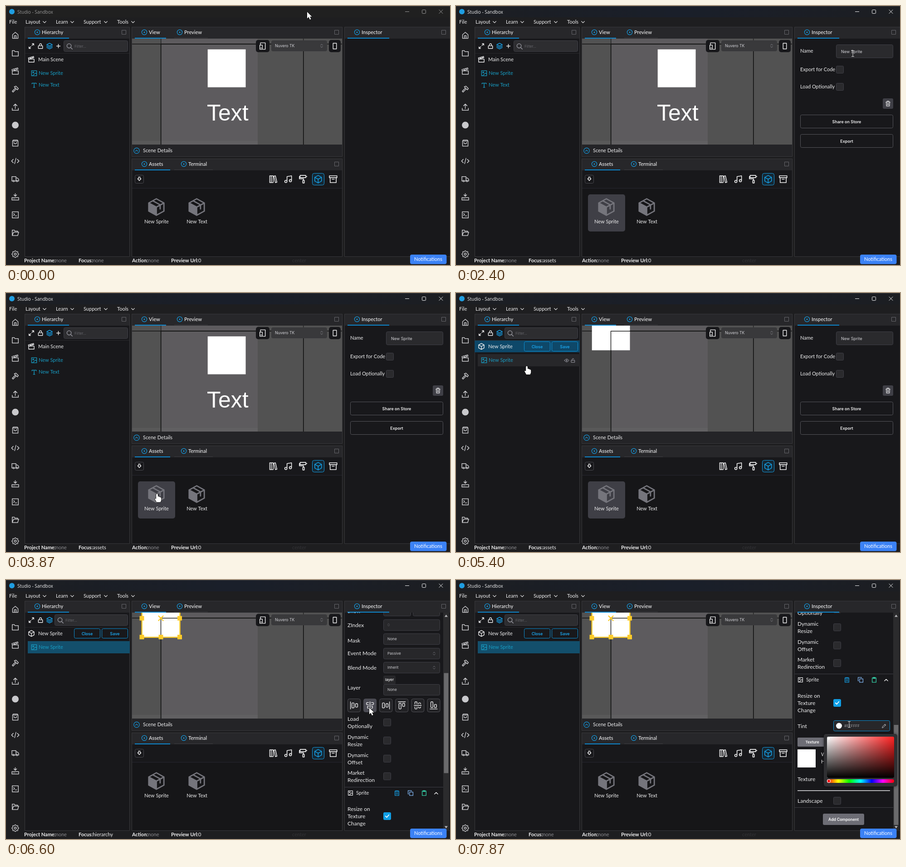
An HTML page with a canvas that plays this animation: 979 px wide and 572 px high, repeating every 8 s.

```html
<!DOCTYPE html>
<html lang="en">
<head>
<meta charset="utf-8">
<title>Studio</title>
<style>
html, body { margin: 0; width: 100%; height: 100%; overflow: hidden; background: #18181b; }
canvas { display: block; width: 979px; height: 572px; }
</style>
</head>
<body>
<canvas id="stage" width="979" height="572"></canvas>
<script>
const ctx = document.getElementById('stage').getContext('2d');
const LOOP = 8000;
const UI = '11px Lato, sans-serif', BOLD = 'bold 11px Lato, sans-serif', LABEL = '12px Lato, sans-serif';
const FIELD = '9px Inter, sans-serif', TINY = '8.2px Inter, sans-serif';
const BUTTON = '600 9px Inter, sans-serif', WINDOW = '10px "Open Sans", sans-serif';
const WHITE = '#f0f0f1', GREY = '#8a8a8f', BLUE = '#159be0', TEAL = '#189dc4', EDGE = '#3f3f46';
const PANEL = '#18181b', BAR = '#27272a';

// Rounded box as path data, for the alignment icons.
const pill = (x, y, w, h) => `M${x + 2} ${y}h${w - 4}q2 0 2 2v${h - 4}q0 2-2 2h${4 - w}q-2 0-2-2v${4 - h}q0-2 2-2z`;

const ICONS = {
  home: 'M4 10l8-7 8 7v11H4zM9.5 21v-8h5v8',
  folder: 'M3 4h6l2 3h10v13H3z',
  clapper: 'M3 11h18v10H3zM3 11l-1-4 17-5 1 4zM7 5.5l4 3.2M13 4l4 3',
  hammer: 'M14 12l-8.5 8.5-2.5-2.5L11.5 9.5M9 5l5-2 7 7-3 4z',
  upload: 'M3 15v6h18v-6M12 16V3M7 8l5-5 5 5',
  bag: 'M4 6h16v15H4zM4 6l2-3h12l2 3M8 10a4 4 0 0 0 8 0',
  code: 'M6 7l-5 5 5 5M18 7l5 5-5 5M14 4l-4 16',
  truck: 'M5 18H2V5h12v13H9M14 9h4l4 4v5h-3M5 18a2 2 0 1 0 4 0 2 2 0 1 0-4 0M15 18a2 2 0 1 0 4 0 2 2 0 1 0-4 0M14 18h1',
  drive: 'M12 2v8M8 6l4 4 4-4M2 14h20v7H2zM6 17.5h.1M10 17.5h.1',
  console: 'M3 3h18v18H3zM7 8l3 3-3 3M12 15h4',
  open: 'M3 20V4h6l2 3h8v3M3 20l4-10h15l-3 10z',
  expand: 'M14 10l7-7M15 3h6v6M10 14l-7 7M3 15v6h6',
  lock: 'M4 11h16v10H4zM8 11V7a4 4 0 0 1 8 0v4',
  unlock: 'M4 11h16v10H4zM8 11V7a4 4 0 0 1 8-1',
  layers: 'M12 2l10 5-10 5L2 7zM2 12l10 5 10-5M2 17l10 5 10-5',
  plus: 'M4 12h16M12 4v16',
  search: 'M3 10.5a7.5 7.5 0 1 0 15 0 7.5 7.5 0 1 0-15 0M16 16l6 6',
  image: 'M3 3h18v18H3zM7 9a2 2 0 1 0 4 0 2 2 0 1 0-4 0M21 15l-4-4L6 21',
  type: 'M4 7V4h16v3M12 4v16M9 20h6',
  box: 'M12 2l9 5v10l-9 5-9-5V7zM3 7l9 5 9-5M12 12v10',
  eye: 'M1 12q11-15 22 0-11 15-22 0M9 12a3 3 0 1 0 6 0 3 3 0 1 0-6 0',
  books: 'M3 3h4v18H3zM7 3h5v18H7zM14 4l4-1 4 17-4 1z',
  music: 'M9 18V5l12-2v13M3 18a3 3 0 1 0 6 0 3 3 0 1 0-6 0M15 16a3 3 0 1 0 6 0 3 3 0 1 0-6 0',
  roller: 'M4 2h15v6H4zM4 5H2v6h11v4M11 15h4v7h-4zM19 5h3',
  archive: 'M2 3h20v5H2zM4 8v13h16V8M9 12h6',
  arrow: 'M9 4h6v7h4l-7 8-7-8h4z',
  trash: 'M3 6h18M5 6l1 16h12l1-16M8 6V2h8v4M10 11v6M14 11v6',
  phone: 'M6 2h12v20H6z',
  devices: 'M5 9V2h15v20h-7M3 9h8v13H3zM6 18h2',
  list: 'M4 4h16v18H4zM8 2v4M12 2v4M16 2v4M8 11h8M8 16h8',
  copy: 'M8 8h14v14H8zM4 16H2V2h14v2',
  paste: 'M4 4h16v18H4zM8 2h8v4H8z',
  pencil: 'M3 21l1-5L16 4l4 4L8 20zM14 6l4 4',
  down: 'M4 8l8 8 8-8',
  up: 'M4 16l8-8 8 8',
  sort: 'M7 9l5-5 5 5M7 15l5 5 5-5',
  check: 'M4 12l6 6L20 6',
  cross: 'M4 4l16 16M20 4L4 20',
  alignLeft: 'M2 2v20' + pill(6, 5, 6, 14) + pill(16, 7, 6, 10),
  alignRight: 'M22 2v20' + pill(2, 5, 6, 14) + pill(12, 7, 6, 10),
  alignTop: 'M2 2h20' + pill(4, 6, 6, 16) + pill(14, 6, 6, 9),
  alignBottom: 'M2 22h20' + pill(4, 2, 6, 16) + pill(14, 9, 6, 9),
  alignCenter: 'M12 2v20M8 10H4q-2 0-2-2V6q0-2 2-2h4M16 10h4q2 0 2-2V6q0-2-2-2h-4M8 20H7q-2 0-2-2v-2q0-2 2-2h1M16 14h1q2 0 2 2v2q0 2-2 2h-1',
  alignMiddle: 'M2 12h20M10 16v4q0 2-2 2H6q-2 0-2-2v-4M10 8V4q0-2-2-2H6Q4 2 4 4v4M20 16v1q0 2-2 2h-2q-2 0-2-2v-1M14 8V7q0-2 2-2h2q2 0 2 2v1'
};
for (const name in ICONS) ICONS[name] = new Path2D(ICONS[name]);

const POINTER = new Path2D('M0 0V14.5L3.5 11.3 6 17 8.5 16 6 10.5H10.5Z');
const HAND = new Path2D('M-2 2Q0-1.5 2 2V7Q4 5.5 5 8 7 7 8 9 10 8 10 11V15Q10 17 8 20H-1L-5 13Q-6 10-2 12Z');
// Solid left face; the lid panels and the right face are cut out.
const PARCEL = new Path2D('M128 15l104 57v112l-104 57-104-57V72z'
  + 'M128 32l80 44-30 16-80-44zM128 120L48 76l34-19 80 44zM216 176l-80 43v-85l32-18v36q0 8 8 8t8-8v-44l32-18z');

function rect(x0, y0, x1, y1, fill, stroke, radius = 0) {
  const inset = stroke ? 0.5 : 0;
  ctx.beginPath();
  ctx.roundRect(x0 + inset, y0 + inset, x1 - x0 - 2 * inset, y1 - y0 - 2 * inset, radius);
  if (fill) { ctx.fillStyle = fill; ctx.fill(); }
  if (stroke) { ctx.strokeStyle = stroke; ctx.lineWidth = 1; ctx.stroke(); }
}
function text(s, x, y, color = WHITE, font = UI, align = 'left') {
  ctx.font = font; ctx.fillStyle = color; ctx.textAlign = align;
  ctx.fillText(s, x, y);
}
function disc(x, y, r, fill, stroke, width = 1.2) {
  ctx.beginPath(); ctx.arc(x, y, r, 0, 7);
  if (fill) { ctx.fillStyle = fill; ctx.fill(); }
  if (stroke) { ctx.strokeStyle = stroke; ctx.lineWidth = width; ctx.stroke(); }
}
function icon(name, x, y, size, color = '#d4d4d8', width = 1.4) {
  const k = size / 24;
  ctx.save();
  ctx.translate(x, y); ctx.scale(k, k); ctx.translate(-12, -12);
  ctx.strokeStyle = color; ctx.lineWidth = width / k;
  ctx.lineCap = ctx.lineJoin = 'round';
  ctx.stroke(ICONS[name]);
  ctx.restore();
}
function clipped(x0, y0, x1, y1, paint) {
  ctx.save(); ctx.beginPath(); ctx.rect(x0, y0, x1 - x0, y1 - y0); ctx.clip();
  paint(); ctx.restore();
}
const clamp = v => Math.max(0, Math.min(1, v));
const smooth = v => (v = clamp(v), v * v * (3 - 2 * v));
const inside = (p, x0, y0, x1, y1) => p.x >= x0 && p.x <= x1 && p.y >= y0 && p.y <= y1;

// time, x, y
const TRACK = [
  [0, 664, 13], [200, 664, 13], [930, 352, 435], [1800, 352, 435], [2400, 875, 105],
  [2600, 920, 124], [2900, 890, 252], [3470, 378, 487], [3670, 296, 476], [3870, 333, 443],
  [4730, 333, 443], [5400, 156, 161], [5670, 156, 161], [6380, 801, 282], [6650, 801, 282],
  [6800, 798, 297], [7000, 798, 297], [7350, 832, 352], [7670, 867, 319], [8000, 867, 319]
];
function slope(i, axis) {
  const a = TRACK[i - 1], b = TRACK[i], c = TRACK[i + 1];
  if (!a || !c) return 0;
  const before = b[axis] - a[axis], after = c[axis] - b[axis];
  return before * after <= 0 ? 0 : (before + after) / (c[0] - a[0]);
}
function pointerAt(t) {
  const i = Math.max(0, TRACK.findIndex(k => k[0] > t) - 1);
  const a = TRACK[i], b = TRACK[i + 1], span = b[0] - a[0], u = (t - a[0]) / span;
  const at = axis => {
    const w = smooth(u);
    return a[axis] * (1 - w) + b[axis] * w
      + span * u * (1 - u) * ((1 - u) * slope(i, axis) - u * slope(i + 1, axis));
  };
  return { x: at(1), y: at(2) };
}

function stateAt(t) {
  return {
    t,
    p: pointerAt(t),
    active: t >= 1270,
    focus: t < 1270 || t >= 7870 ? 'none' : t < 5670 ? 'assets' : 'hierarchy',
    asset: t >= 1330 && t < 5670,
    prefab: t >= 4330,
    selected: t >= 5670,
    scroll: 515 * smooth((t - 6391) / 410),
    picker: t >= 7870
  };
}

function tab(name, x, y, from, to, on = true) {
  disc(x, y, 5.6, null, BLUE);
  disc(x, y, 1.5, BLUE);
  text(name, x + 10, y + 3.5, WHITE, '500 11px Lato, sans-serif');
  rect(from, y + 12, to, y + (on ? 14 : 13), on ? '#0d86cc' : '#3a3a3e');
}
function panel(x0, y0, x1, y1) {
  rect(x0, y0, x1, y1, PANEL, '#38383b');
  rect(x0 + 1, y0 + 1, x1 - 1, y0 + 26, BAR);
}

function drawFrame(s) {
  rect(0, 0, 979, 572, '#1e1e20');
  rect(0, 0, 979, 25, s.active ? gradient(0, 0, 979, 0, '#1c1e22', '#1a1f2a', '#1c1e22') : '#202020');
  rect(0, 0, 979, 1, '#39393b');
  disc(13, 12.5, 6, '#1f9de0');
  const tone = s.active ? WHITE : '#989898';
  text('Studio - Sandbox', 25, 16.5, tone, WINDOW);
  rect(880, 12, 889, 13, tone);
  rect(917, 8, 926, 17, null, tone, 1);
  icon('cross', 959, 12.5, 12, tone, 1);
  text('File', 7, 38.5);
  [['Layout', 43, 85], ['Learn', 110, 146], ['Support', 171, 220], ['Tools', 245, 280]].forEach(([name, x, cx]) => {
    text(name, x, 38.5);
    icon('down', cx, 35.5, 10, WHITE, 1.2);
  });
  ['home', 'folder', 'clapper', 'hammer', 'upload', '', 'bag', 'code', 'truck', 'drive', 'console', 'open']
    .forEach((name, i) => {
      const y = 64.8 + i * 39.65;
      if (name) icon(name, 20.5, y, 18, '#c9c9cc', 1.5);
      else disc(20.5, y, 7.5, '#c9c9cc');
    });
  ctx.beginPath();
  for (let i = 0; i <= 96; i++) {
    const a = i * Math.PI / 48, r = 6.7 + 0.9 * Math.cos(8 * a);
    ctx.lineTo(20.5 + r * Math.cos(a), 548 + r * Math.sin(a));
  }
  ctx.strokeStyle = '#c9c9cc'; ctx.lineWidth = 1.4; ctx.stroke();
  disc(20.5, 548, 2.3, null, '#c9c9cc', 1.4);

  panel(41, 46, 273, 554); panel(277, 46, 742, 333);
  panel(277, 337, 742, 554); panel(746, 46, 980, 554);
  tab('Hierarchy', 69, 58, 48, 139);
  tab('View', 305, 58, 284, 353); tab('Preview', 383, 58, 371, 445, false);
  tab('Assets', 305, 349, 284, 362); tab('Terminal', 392, 349, 371, 456, false);
  tab('Inspector', 774, 58, 753, 845);
  [[260, 58], [729, 58], [729, 349], [965, 58]].forEach(([x, y]) => rect(x - 5, y - 5, x + 5, y + 5, null, '#66666b'));
}

function drawStatus(s) {
  [['Project Name:', 40, 'none'], ['Focus:', 160, s.focus], ['Action:', 278, 'none'], ['Preview Url:', 364, '0']]
    .forEach(([label, x, value]) => {
      text(label, x, 566, WHITE, BOLD);
      text(value, x + ctx.measureText(label).width, 566, value === 'none' ? GREY : WHITE);
    });
  text('center', 631, 566, '#333336');
  rect(891, 549, 971.5, 570, '#3b82f6', null, 4);
  text('Notifications', 931, 563, '#fff', UI, 'center');
}

function drawHierarchy(s) {
  const left = s.prefab ? 107 : 127;
  icon('expand', 56, 88.5, 14, WHITE);
  icon('lock', 76, 88.5, 14, WHITE);
  icon('layers', 96, 88.5, 15, BLUE);
  if (!s.prefab) icon('plus', 115.5, 88.5, 12, WHITE);
  rect(left, 76, 269, 101, '#2d2d30', EDGE, 3);
  icon('search', left + 13, 89, 15, '#a1a1aa', 1.3);
  text('Filter...', left + 24, 91.5, '#67676c', TINY);
  rect(42, 104, 272, 105, '#29292c');
  if (s.prefab && !s.selected) rect(41, 105, 273, 131, '#0e4869');
  icon(s.prefab ? 'box' : 'clapper', 56, 118, 16, WHITE);
  text(s.prefab ? 'New Sprite' : 'Main Scene', 71, 121.5);
  if (s.prefab) {
    [['Close', 150, 208], ['Save', 211, 269]].forEach(([name, x0, x1]) => {
      rect(x0, 107, x1, 129, null, '#0e8fd2', 3);
      text(name, (x0 + x1) / 2, 122, '#1ba4ea', BUTTON, 'center');
    });
    const hover = inside(s.p, 48, 135, 273, 162);
    if (s.selected) rect(48, 135, 273, 162, '#134f6c');
    else if (hover) {
      rect(48, 135, 273, 162, BAR);
      icon('eye', 244, 149, 11, '#a1a1aa', 1);
      icon('unlock', 258, 149, 11, '#a1a1aa', 1);
    }
  } else {
    icon('type', 62, 175, 14, TEAL);
    text('New Text', 72, 178, TEAL);
  }
  icon('image', 62, 148.5, 15, TEAL, 1.3);
  text('New Sprite', 72, 152, TEAL);
}

function drawView(s) {
  clipped(278, 72, 741, 306, () => {
    rect(277, 72, 742, 306, '#525252');
    rect(342, 72, 555, 306, '#5d5b5e');
    rect(277, 298, 555, 306, 'rgba(110,110,110,.28)');
    rect(277, 83, 742, 85, '#222');
    rect(341, 72, 342.4, 306, '#222');
    rect(655, 72, 656.4, 306, '#222');
    const [x, y] = s.prefab ? [299.7, 42.7] : [444.7, 95.7];
    rect(x, y, x + 83.8, y + 83.8, '#fff');
    if (!s.prefab) text('Text', 443, 252.5, '#fff', '50px "Liberation Sans", Arial, sans-serif');
    ctx.strokeStyle = '#111'; ctx.lineWidth = 1.4;
    ctx.strokeRect(341.5, 84.3, 314.3, 400);
    if (s.selected) {
      const gold = '#fccb2b';
      ctx.strokeStyle = gold; ctx.lineWidth = 2.4;
      ctx.strokeRect(299.7, 42.7, 83.8, 83.8);
      for (const cx of [299.5, 341.5, 383]) for (const cy of [84.5, 126])
        if (cx !== 341.5 || cy > 100) rect(cx - 5, cy - 5, cx + 5, cy + 5, gold);
      icon('cross', 341.5, 84.5, 15, gold, 2.4);
      rect(339, 82, 344, 87, gold);
    }
  });
  rect(551, 75, 581, 102, '#18181b', null, 5);
  icon('devices', 566, 88.5, 17, WHITE);
  rect(585, 76, 708, 100, '#39393b', null, 4);
  text('Nuvero TK', 593, 91, '#d4d4d8', '8.6px Inter, sans-serif');
  icon('sort', 696, 88, 11, '#85858b', 1);
  rect(712, 75, 738, 102, '#18181b', null, 5);
  icon('phone', 725, 88.5, 15, WHITE);
  rect(278, 306, 741, 332, '#242427');
  disc(288, 319.5, 6.2, null, BLUE);
  icon('up', 288, 319.5, 8, BLUE, 1.2);
  text('Scene Details', 302, 323);
}

function drawParcel(x, y) {
  ctx.save();
  ctx.translate(x, y); ctx.scale(0.174, 0.174); ctx.translate(-128, -128);
  ctx.fillStyle = '#75757c';
  ctx.fill(PARCEL, 'evenodd');
  ctx.restore();
}

function drawAssets(s) {
  rect(284, 373, 304, 392, null, '#4b4b50', 3);
  icon('arrow', 294, 382, 13, WHITE, 1.3);
  rect(675, 369, 702, 396, '#152733', BLUE, 4);
  ['books', 'music', 'roller', 'box', 'archive'].forEach((name, i) =>
    icon(name, 589 + i * 33.1, 382.5, 20, name === 'box' ? BLUE : WHITE, 1.6));
  rect(278, 402, 741, 403, '#26272f');
  rect(278, 403, 741, 553, '#161618');
  ['New Sprite', 'New Text'].forEach((name, i) => {
    const x = 291 + i * 89, hover = inside(s.p, x, 416, x + 82, 498);
    let back = hover ? '#27272a' : '#161618';
    if (!i && s.asset) {
      const w = smooth((s.t - 1270) / 260), mix = (a, b) => Math.round(a + (b - a) * w);
      back = `rgb(${mix(39, 63)},${mix(39, 63)},${mix(42, 70)})`;
    }
    rect(x, 416, x + 82, 498, back, null, 5);
    drawParcel(x + 40.5, 444);
    text(name, x + 41, 480, WHITE, UI, 'center');
  });
}

function checkbox(x, y, on) {
  rect(x, y, x + 17, y + 17, on ? '#109fe6' : '#2a2a2d', on ? '#109fe6' : EDGE, 2);
  if (on) icon('check', x + 8.5, y + 8.5, 11, '#fff', 1.8);
}
function field(y0, y1, value, { x0 = 832, x1 = 957, color = '#d0d0d4', select } = {}) {
  rect(x0, y0, x1, y1, '#27272a', EDGE, 3);
  text(value, x0 + 9, (y0 + y1) / 2 + 3, color, TINY);
  if (select) icon('sort', 944, (y0 + y1) / 2, 10, '#73737a', 1);
}
const label = (s, y) => s.split('|').forEach((part, i) => text(part, 753, y + i * 16.2, WHITE, LABEL));

function drawAssetInspector(s) {
  text('Name', 759, 103);
  rect(838, 85, 964, 115, '#2a2a2d', EDGE, 3);
  text('New Sprite', 849, 104, '#d4d4d8', FIELD);
  text('Export for Code', 759, 144); checkbox(838, 132);
  text('Load Optionally', 759, 182); checkbox(838, 170);
  rect(941, 204, 964, 227, EDGE, null, 3);
  icon('trash', 952.5, 215.5, 13, WHITE, 1.2);
  [['Share on Store', 240], ['Export', 283]].forEach(([name, y]) => {
    rect(759, y, 964, y + 30, inside(s.p, 759, y, 964, y + 30) ? BAR : null, '#55555b', 3);
    text(name, 861.5, y + 19, WHITE, BUTTON, 'center');
  });
}

function drawComponents(s) {
  const pair = (y, a, b) => { field(y, y + 25, a, { x1: 893 }); field(y, y + 25, b, { x0: 897 }); };
  label('Name', -157); field(-174, -149, 'New Sprite');
  label('Position', -119); pair(-136, '0', '0');
  label('Scale', -81); pair(-98, '1', '1');
  label('Angle', -43); field(-60, -35, '0');
  label('Alpha', -5); field(-22, 3, '1');
  label('Anchor', 33); pair(16, '0.5', '0.5');
  label('Show', 73); pair(55, '', '');
  label('ZIndex', 104); field(87, 112, '0', { color: '#55555a' });
  label('Mask', 138); field(118, 143, 'None');
  label('Event Mode', 166); field(150, 175, 'Passive', { select: true });
  label('Blend Mode', 198); field(181, 206, 'Inherit', { select: true });
  rect(832, 211, 859, 231, BAR, null, 3);
  text('layer', 845.5, 223.5, WHITE, '500 8.2px Inter, sans-serif', 'center');
  label('Layer', 242); field(230, 255, 'None');
  const shift = 265 - s.scroll;
  ['Left', 'Center', 'Right', 'Top', 'Middle', 'Bottom'].forEach((side, i) => {
    const x = 753 + i * 35.1, hover = inside(s.p, x, 262 + shift, x + 29, 292 + shift);
    rect(x, 262, x + 29, 292, hover ? '#4a4a53' : '#222225', '#505056', 4);
    icon('align' + side, x + 14.5, 277, 19, WHITE, 1.4);
  });
  [['Load|Optionally', 311, 306], ['Dynamic|Resize', 351, 346], ['Dynamic|Offset', 391, 386], ['Market|Redirection', 430, 425]]
    .forEach(([name, y, cy]) => { label(name, y); checkbox(832, cy); });
  rect(747, 457, 964, 458, EDGE);
  icon('image', 759.5, 470.5, 13, WHITE, 1.1);
  text('Sprite', 772, 474);
  icon('list', 862, 470.5, 13, BLUE, 1.3);
  icon('copy', 892, 470.5, 13, '#7fb3ef', 1.3);
  icon('paste', 922, 470.5, 13, '#35d0a8', 1.3);
  icon('up', 948.5, 471, 11, WHITE, 1.4);
  label('Resize on|Texture|Change', 510); checkbox(832, 513, true);
  label('Tint', 577);
  rect(832, 560, 957, 584, '#27272a', s.picker ? '#0e8fd2' : EDGE, 3);
  disc(844.5, 572, 6.5, '#fff');
  text('#FFFFFF', 856, 575, '#a1a1a6', TINY);
  icon('pencil', 944, 572, 11, '#c4c4c8', 1);
  rect(753, 598, 818, 618, '#6d6d75', null, 2);
  text('Texture', 785.5, 611, '#fff', '600 8.2px Inter, sans-serif', 'center');
  rect(753, 624, 793, 664, '#fff');
  text('Width: 100', 805, 638.5);
  text('Height: 100', 805, 655);
  label('Texture', 694); field(678, 702, 'None');
  rect(753, 714.5, 957, 716, '#e4e4e7');
  label('Landscape', 742); checkbox(832, 729);
  rect(747, 752, 964, 753, EDGE);
  rect(809, 766, 900, 791, '#6d6d75', null, 3);
  text('Add Component', 854.5, 781.5, '#fff', '600 8.5px Inter, sans-serif', 'center');
}

function drawScrollbar(scroll) {
  const top = 84 + 236 * scroll / 515;
  rect(964, 72, 977, 554, '#2b2b2d');
  rect(965.5, top, 975.5, top + 221, '#6a6a6c');
  for (const [y, d] of [[79, -2.5], [546, 2.5]]) {
    ctx.beginPath(); ctx.moveTo(967, y - d); ctx.lineTo(974, y - d); ctx.lineTo(970.5, y + d);
    ctx.fillStyle = '#b5b5b8'; ctx.fill();
  }
}

function gradient(x0, y0, x1, y1, ...stops) {
  const g = ctx.createLinearGradient(x0, y0, x1, y1);
  stops.forEach((c, i) => g.addColorStop(i / (stops.length - 1), c));
  return g;
}
function drawPicker() {
  ctx.save();
  ctx.shadowColor = 'rgba(0,0,0,.5)'; ctx.shadowBlur = 6;
  rect(811, 340, 973, 456, '#303033', null, 5);
  ctx.restore();
  rect(818, 346, 966, 437, gradient(818, 0, 966, 0, '#fff', '#ff2222'), null, 3);
  rect(818, 346, 966, 437, gradient(0, 346, 0, 437, 'rgba(0,0,0,0)', '#000'), null, 3);
  rect(818, 440, 966, 448, gradient(818, 0, 966, 0, '#f00', '#ff0', '#0f0', '#0ff', '#00f', '#f0f', '#f00'), null, 4);
  disc(822, 350, 3.5, '#fff', '#ddd', 1);
  disc(822, 444, 3.5, '#f00', '#fff', 1.2);
}

function drawInspector(s) {
  if (s.asset) drawAssetInspector(s);
  if (!s.selected) return;
  clipped(747, 72, 964, 553, () => {
    ctx.translate(0, 265 - s.scroll);
    drawComponents(s);
  });
  drawScrollbar(s.scroll);
  if (s.picker) drawPicker();
}

function drawPointer({ p, t, asset }) {
  const beam = asset && inside(p, 838, 85, 964, 115) || t > 6800 && inside(p, 832, 309, 957, 334);
  const hand = inside(p, 291, 416, 373, 498) || inside(p, 380, 416, 462, 498)
    || inside(p, 48, 135, 273, 162) || asset && inside(p, 759, 240, 964, 313);
  ctx.save();
  ctx.translate(p.x, p.y);
  if (beam) {
    rect(-0.5, -6, 0.5, 6, '#d8d8d8');
    rect(-3, -7, 3, -6, '#d8d8d8');
    rect(-3, 6, 3, 7, '#d8d8d8');
  } else {
    const shape = hand ? HAND : POINTER;
    if (hand) ctx.scale(0.92, 0.95);
    ctx.strokeStyle = '#111'; ctx.lineWidth = 1.6; ctx.lineJoin = 'round';
    ctx.stroke(shape);
    ctx.fillStyle = '#fff'; ctx.fill(shape);
  }
  ctx.restore();
}

function draw(now) {
  const s = stateAt(now % LOOP);
  drawFrame(s);
  drawHierarchy(s);
  drawView(s);
  drawAssets(s);
  drawInspector(s);
  drawStatus(s);
  drawPointer(s);
}

let start;
function tick(now) {
  start ??= now;
  draw(now - start);
  requestAnimationFrame(tick);
}
draw(0);
requestAnimationFrame(tick);
</script>
</body>
</html>
```
